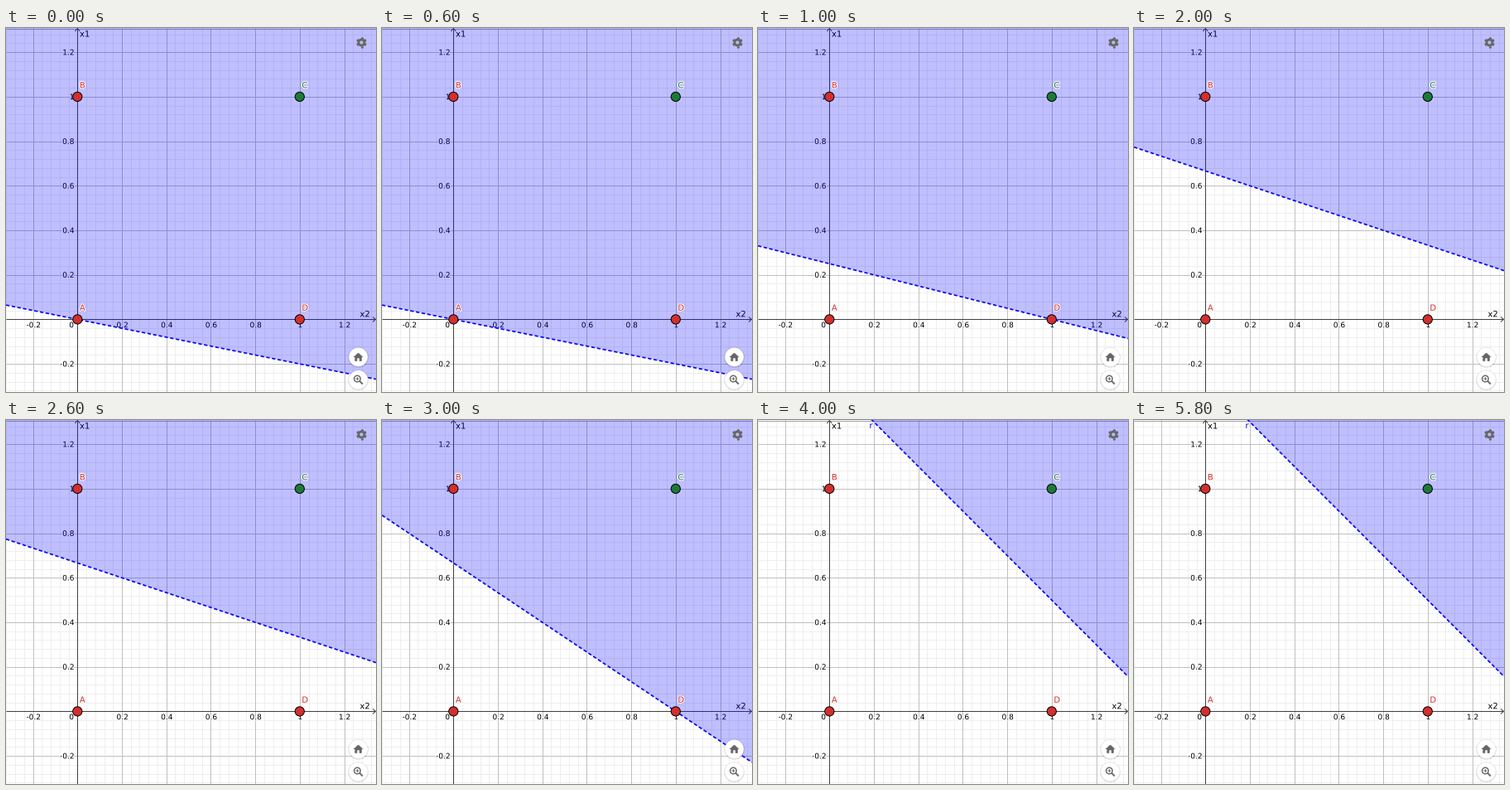
A matplotlib script for the animation above (7 s loop, 447x439 px).

```python
import numpy as np
import matplotlib.pyplot as plt
from matplotlib.animation import FuncAnimation
from matplotlib.patches import Circle, Polygon
from matplotlib.patheffects import withStroke

W, H, DPI = 447, 439, 64           # a power of two keeps the pixel size exact
PT = 72 / DPI                      # points per pixel
X0, Y0, UNIT = 86.3, 351.4, 268.5  # origin and scale in pixels
RED, GREEN, BLUE, ICON = "#d32f2f", "#1b7a35", "#0000ff", "#666666"

# (intercept, slope) of the boundary, one per second; the last one holds
BOUNDARIES = [(0, -1 / 5), (1 / 4, -1 / 4), (2 / 3, -1 / 3),
              (2 / 3, -2 / 3), (3 / 2, -1)]
SECONDS = 7

plt.rcParams["font.family"] = "DejaVu Sans"
fig = plt.figure(figsize=(W / DPI, H / DPI), dpi=DPI, facecolor="white")
ax = fig.add_axes([0, 0, 1, 1])
ax.set_xlim(0, W)
ax.set_ylim(H, 0)
ax.axis("off")


def px(x):
    return X0 + UNIT * x


def py(y):
    return Y0 - UNIT * y


def line(xs, ys, color, width=1.0, z=1, **kw):
    kw.setdefault("solid_capstyle", "butt")
    return ax.plot(xs, ys, color=color, lw=width * PT, zorder=z, **kw)[0]


def text(x, y, s, size, color="black", ha="left", z=2, halo=2.0):
    return ax.text(x, y, s, fontsize=size * PT, color=color, ha=ha,
                   va="baseline", zorder=z,
                   path_effects=[withStroke(linewidth=halo * PT,
                                            foreground="white")])


def disc(x, y, r, face, edge="none", width=0.0, z=6):
    ax.add_patch(Circle((x, y), r, fc=face, ec=edge, lw=width * PT, zorder=z))


def draw_grid():
    for k in range(-9, 35):
        major = k % 5 == 0
        color = "#c0c0c0" if major else "#eeeeee"
        z = 1 if major else 0.5
        line([px(k / 25)] * 2, [0, H], color, z=z)
        line([0, W], [py(k / 25)] * 2, color, z=z)
    line([0, W], [0.5, 0.5], "#a0a0a0", z=1)


def draw_axes():
    dark = "#404040"
    line([0, W], [Y0, Y0], dark, z=1.5)
    line([X0, X0], [0, H], dark, z=1.5)
    line([W - 4, W - 0.5, W - 4], [Y0 - 3, Y0, Y0 + 3], dark, z=1.5)
    line([X0 - 3, X0, X0 + 3], [4, 0.5, 4], dark, z=1.5)
    for k in (-1, 1, 2, 3, 4, 5, 6):
        s = f"{k / 5:g}"
        text(px(k / 5) + 0.6, 361.2, s, 9, ha="center")
        text(82.5, py(k / 5) + 3.2, s, 9, ha="right")
    text(82, 361.2, "0", 9, ha="right")
    text(89, 10.5, "x1", 10)
    text(427.5, 348.3, "x2", 10)


def draw_points():
    for name, x, y, color in [("A", 0, 0, RED), ("B", 0, 1, RED),
                              ("C", 1, 1, GREEN), ("D", 1, 0, RED)]:
        disc(px(x), py(y), 5.6, color, "black", 1.0)
        text(px(x) + 2.6, py(y) - 10.6, name, 10, color, z=7)


def draw_gear(x, y):
    ax.add_patch(Circle((x, y), 3.5, fc="none", ec=ICON, lw=2.8 * PT, zorder=8))
    for a in np.arange(6) * np.pi / 3 + np.pi / 6:
        c, s = np.cos(a), np.sin(a)
        line([x + 4 * c, x + 6.3 * c], [y + 4 * s, y + 6.3 * s], ICON, 3, 8)


def draw_button(x, y):
    for r, shade in [(12.6, 0.05), (12.0, 0.09)]:
        disc(x, y + 0.5, r, (0, 0, 0, shade), z=8)
    disc(x, y, 11.3, "white", z=9)


def draw_home(x, y):
    draw_button(x, y)
    half = [(0, -5.2), (6, 0.2), (4.2, 0.2), (4.2, 5), (1.3, 5), (1.3, 1.5)]
    shape = half + [(-a, b) for a, b in half[:0:-1]]
    ax.add_patch(Polygon([(x + a, y + b) for a, b in shape],
                         fc=ICON, ec="none", zorder=10))


def draw_zoom(x, y):
    draw_button(x, y)
    cx, cy = x - 1.2, y - 1.2
    ax.add_patch(Circle((cx, cy), 3.8, fc="none", ec=ICON, lw=1.4 * PT,
                        zorder=10))
    line([cx + 3, cx + 6.5], [cy + 3, cy + 6.5], ICON, 1.9, 10)
    line([cx - 2, cx + 2], [cy, cy], ICON, 1, 10, snap=False)
    line([cx, cx], [cy - 2, cy + 2], ICON, 1, 10, snap=False)


draw_grid()
draw_axes()
draw_points()
draw_gear(429.5, 17.5)
draw_home(425.6, 396.8)
draw_zoom(425.6, 424.2)

region = Polygon([(0, 0), (W, 0), (W, H)], fc=BLUE, alpha=0.25, lw=0, zorder=3)
ax.add_patch(region)
edge = line([], [], BLUE, 1.7, 4, dashes=(2.5, 1.6), dash_capstyle="butt")
tag = text(134.5, 10, "r", 10, BLUE, z=5)


def update(i):
    step = min(i, len(BOUNDARIES) - 1)
    b, m = BOUNDARIES[step]
    xs = np.array([0.0, W])
    ys = py(b + m * (xs - X0) / UNIT)
    top = min(0, ys[0])
    edge.set_data(xs, ys)
    region.set_xy([(0, ys[0]), (W, ys[1]), (W, top), (0, top)])
    tag.set_visible(step == len(BOUNDARIES) - 1)
    return region, edge, tag


anim = FuncAnimation(fig, update, frames=SECONDS, interval=1000,
                     repeat=True, repeat_delay=0)
plt.show()
```
